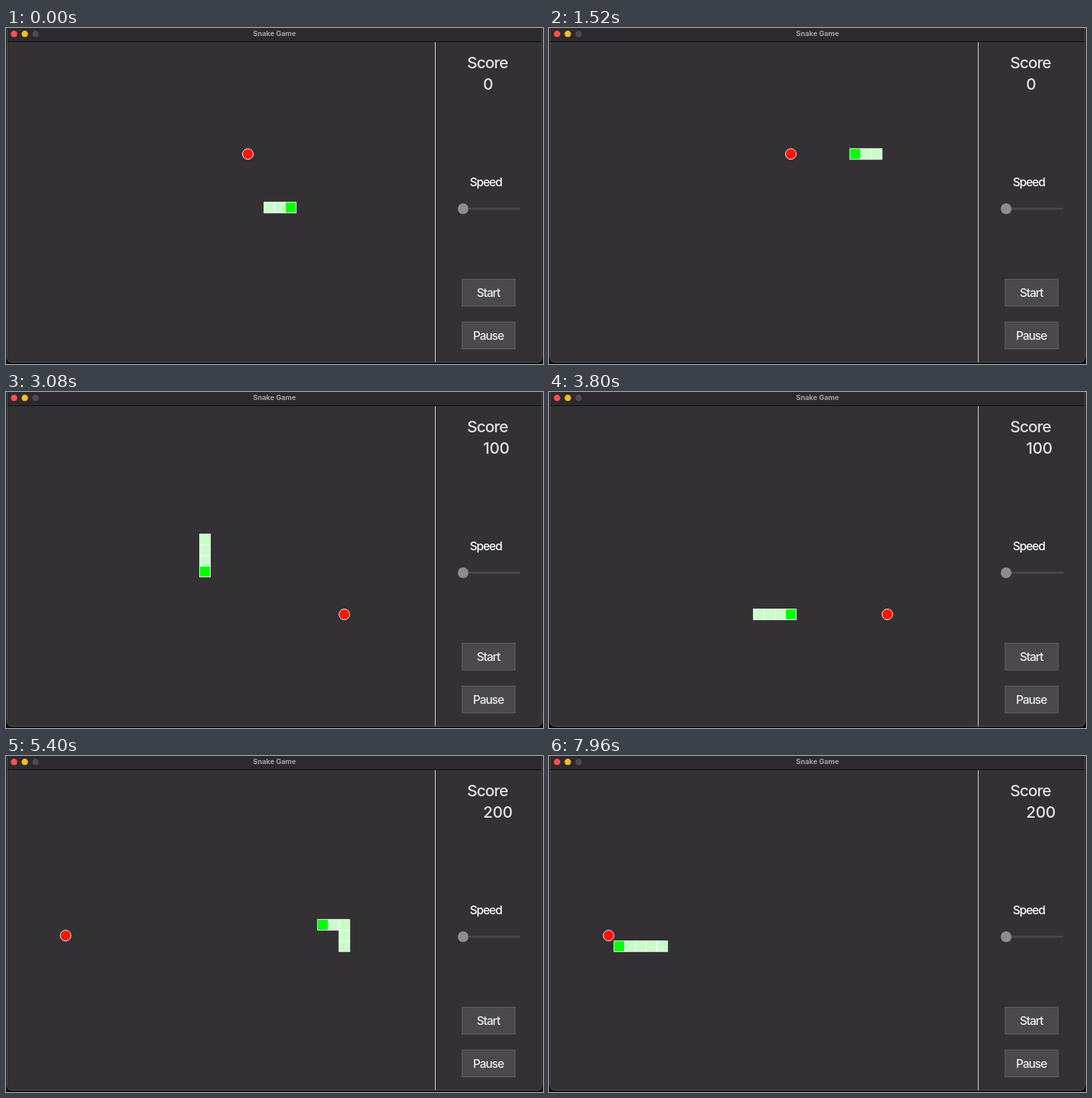
An HTML page that plays this animation: 800x501 px, repeating every 8 s.

```html
<!DOCTYPE html>
<html lang="en">
<head>
<meta charset="utf-8">
<title>Snake Game</title>
<style>
  html, body { margin: 0; width: 100%; height: 100%; overflow: hidden; background: #0b0a0b; }
  svg { display: block; width: 800px; height: 501px; font-family: Inter, Roboto, sans-serif; }
  .title { font-size: 10.5px; font-weight: 700; fill: #a3a1a4; }
  .score { font-size: 23.5px; font-weight: 500; fill: #e4e3e5; letter-spacing: -1px; }
  .digits { letter-spacing: -.4px; }
  .label { font-size: 17.5px; font-weight: 500; fill: #fff; letter-spacing: -1.15px; }
  .caption { fill: #ececed; }
  .middle { text-anchor: middle; }
  .button { fill: #4b494c; stroke: #636164; }
  .cell { fill: #c8ffc8; stroke: #fff; }
  .head { fill: #0f0; }
</style>
</head>
<body>
<svg viewBox="0 0 800 501">
  <path d="M1.500 0V490.500Q1.500 498.500 9.500 498.500H790.500Q798.500 498.500 798.500 490.500V0" fill="#333134" stroke="#5b595c"/>
  <path d="M2 0H798V20H2Z" fill="#2c2a2e"/>
  <path d="M2 20.500H798" stroke="#0c0b0d"/>
  <circle cx="12" cy="8.800" r="4.800" fill="#fe5249"/>
  <circle cx="28" cy="8.800" r="4.800" fill="#fdb827"/>
  <circle cx="44" cy="8.800" r="4.800" fill="#4e4b50"/>
  <text class="title middle" x="400" y="12">Snake Game</text>

  <path d="M639.500 21V498" stroke="#e8e8e8"/>
  <text class="score middle" x="717.300" y="60">Score</text>
  <text class="score digits" id="score" x="710.800" y="92">0</text>
  <text class="label middle" x="714.800" y="236.300">Speed</text>
  <path d="M675 269.500H765" stroke="#4a484b" stroke-width="3" stroke-linecap="round"/>
  <circle cx="681" cy="269.500" r="8" fill="#8e8c8f"/>
  <rect class="button" x="679.500" y="374.500" width="79" height="40"/>
  <text class="label caption middle" x="718.500" y="401.300">Start</text>
  <rect class="button" x="679.500" y="438.500" width="79" height="40"/>
  <text class="label caption middle" x="718.500" y="465.300">Pause</text>

  <g id="snake"></g>
  <circle id="food" r="8" fill="#ff1400" stroke="#fff"/>
</svg>
<script>
  const LOOP = 8000, TICK = 40, STEP = 100;
  const CELL = 15.97, LEFT = 1, TOP = 20.2;
  const ROUTE = "6R5U14L9D13R5U10L2D15L";
  const MOVES = { R: [1, 0], L: [-1, 0], U: [0, -1], D: [0, 1] };
  const FOODS = [[22, 10], [31, 19], [5, 15]];
  const MEALS = [21, 47];
  const START_LENGTH = 3;

  const px = col => LEFT + col * CELL;
  const py = row => TOP + row * CELL;

  // Cells visited by the head, beginning with the starting body.
  const trail = [[24, 15], [25, 15], [26, 15]];
  for (const [, count, turn] of ROUTE.matchAll(/(\d+)(\w)/g)) {
    const [dx, dy] = MOVES[turn];
    for (let i = 0; i < +count; i++) {
      const [x, y] = trail[trail.length - 1];
      trail.push([x + dx, y + dy]);
    }
  }

  const snake = document.getElementById("snake");
  const food = document.getElementById("food");
  const score = document.getElementById("score");

  const cells = Array.from({ length: START_LENGTH + MEALS.length }, () => {
    const cell = document.createElementNS("http://www.w3.org/2000/svg", "rect");
    cell.setAttribute("width", CELL);
    cell.setAttribute("height", CELL);
    return snake.appendChild(cell);
  });
  cells.forEach((cell, i) =>
    cell.setAttribute("class", i === cells.length - 1 ? "cell head" : "cell"));

  function draw(step) {
    const eaten = MEALS.filter(meal => step >= meal).length;
    const head = step + START_LENGTH - 1;
    cells.forEach((cell, i) => {
      const age = cells.length - 1 - i;
      const visible = age < START_LENGTH + eaten;
      cell.style.display = visible ? "" : "none";
      if (!visible) return;
      const [col, row] = trail[head - age];
      cell.setAttribute("x", px(col));
      cell.setAttribute("y", py(row));
    });
    const [col, row] = FOODS[eaten];
    food.setAttribute("cx", px(col + .5));
    food.setAttribute("cy", py(row + .5));
    score.textContent = eaten * 100;
  }

  const begin = performance.now();
  let shown = -1;
  function frame() {
    const time = (performance.now() - begin) % LOOP;
    const step = Math.floor(Math.floor(time / TICK) * TICK / STEP);
    if (step !== shown) draw(shown = step);
    requestAnimationFrame(frame);
  }
  frame();
</script>
</body>
</html>
```
